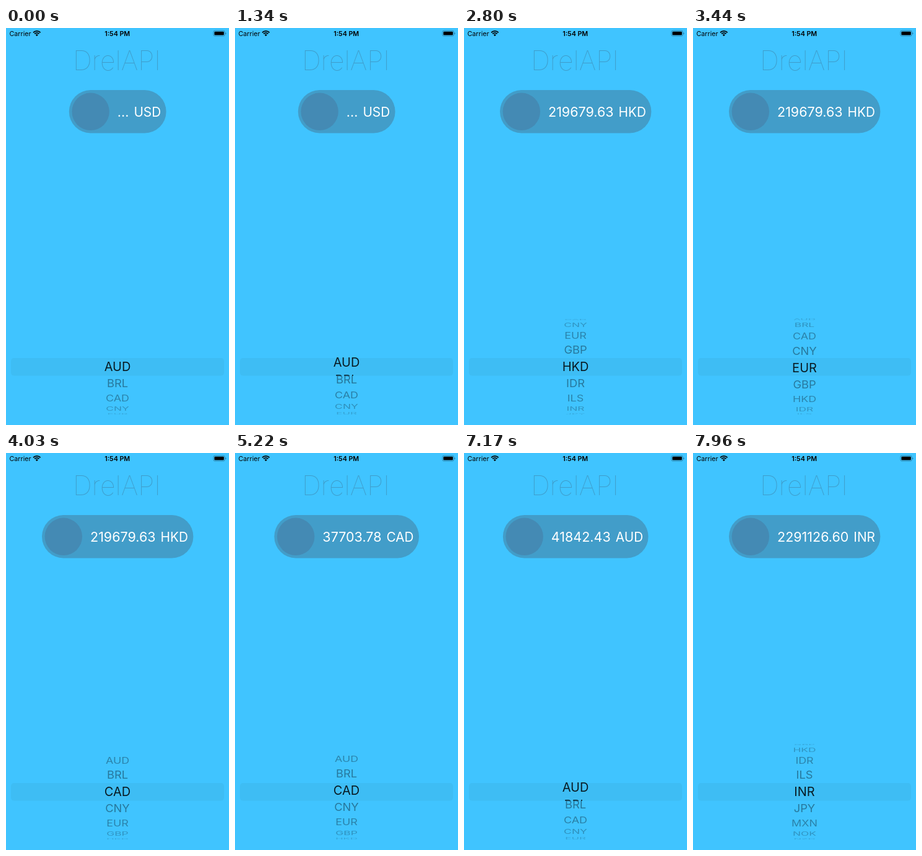
An HTML page that plays this animation: 360 px wide and 640 px high, repeating every 8 s.

```html
<!DOCTYPE html>
<html lang="en">
<head>
<meta charset="utf-8">
<title>Currency picker</title>
<style>
  html, body { margin: 0; width: 100%; height: 100%; overflow: hidden; background: #40c4ff; }
  svg { display: block; width: 100%; height: 100%; font-family: Inter, Roboto, "Liberation Sans", sans-serif; }
  .title { font-size: 43px; font-weight: 100; fill: #3f9bc8; }
  .status { font-size: 10.7px; }
  .price { font-size: 21.5px; fill: #fff; }
  #code { font-size: 20.8px; }
  .wheel { text-anchor: middle; }
</style>
</head>
<body>
<svg viewBox="0 0 360 640">
  <defs>
    <clipPath id="outside"><path d="M0 460H360V531H0ZM0 560.7H360V640H0Z"/></clipPath>
    <clipPath id="inside"><path d="M0 531H360V560.7H0Z"/></clipPath>
  </defs>
  <rect width="360" height="640" fill="#40c4ff"/>

  <g class="status">
    <text x="5.5" y="13">Carrier</text>
    <text x="179.7" y="13" font-weight="600" text-anchor="middle">1:54 PM</text>
    <g fill="none" stroke="#000" stroke-width="1.8">
      <path d="M44 7.3A8.2 8.2 0 0 1 55.6 7.3"/>
      <path d="M46.1 9.4A5.2 5.2 0 0 1 53.5 9.4"/>
    </g>
    <path d="M49.8 13.2L47.7 11.1A3 3 0 0 1 51.9 11.1Z"/>
    <rect x="334.9" y="4.2" width="18.4" height="8.9" rx="2.5" fill="none" stroke="#000" stroke-opacity=".32" stroke-width=".9"/>
    <rect x="336.4" y="5.7" width="15.4" height="5.9" rx="1.3"/>
    <path d="M354.3 7.2Q355.6 7.8 355.6 8.7T354.3 10.2Z" fill-opacity=".4"/>
  </g>

  <text class="title" x="179" y="68" text-anchor="middle">DrelAPI</text>

  <g id="pill" class="price">
    <rect id="back" y="100" height="69.4" rx="34.7" fill="#429dc9"/>
    <circle cx="34.8" cy="134.8" r="30.2" fill="#448ab4"/>
    <text id="num" x="78" y="142.6"></text>
    <text id="code" y="142.6"></text>
  </g>

  <rect x="8" y="532" width="344" height="28.6" rx="5" fill="#3ebdf4"/>
  <g class="wheel" id="rows" clip-path="url(#outside)" font-size="18.4"></g>
  <g class="wheel" id="lens" clip-path="url(#inside)" font-size="20" fill-opacity=".86"></g>
</svg>
<script>
const LOOP = 8000, TICK = 113;
const CENTER = 546, RADIUS = 77, STEP = 20.5;
const NUM_X = 78, GAP = 8, PAD = 8.4;
const CODES = "AUD BRL CAD CNY EUR GBP HKD IDR ILS INR JPY MXN NOK NZD PLN RON".split(" ");
const $ = id => document.getElementById(id);

const smooth = p => p * p * (3 - 2 * p);
const easeOut = p => p * (2 - p);

const prices = [
  { start: 0, amount: "...", code: "USD" },
  { start: 2800, amount: "219679.63", code: "HKD" },
  { start: 5220, amount: "37703.78", code: "CAD" },
  { start: 7170, amount: "41842.43", code: "AUD" },
  { start: 7960, amount: "2291126.60", code: "INR" }
];

// Each gesture turns the wheel between two row positions, then holds.
const gesture = (start, end, from, to, ease) => ({ start, end, from, to, ease });
const gestures = [
  gesture(0, 1, 0, 0, smooth),
  gesture(1230, 1820, .25, 6.25, smooth),
  gesture(2090, 2400, 6.16, 6, easeOut),
  gesture(3200, 4030, 5.8, 2, easeOut),
  gesture(5220, 5480, 2.1, 2.36, easeOut),
  gesture(5590, 6220, 2.3, .13, smooth),
  gesture(6480, 6690, .07, 0, easeOut),
  gesture(7170, 7960, .25, 9, smooth)
];

const current = (list, t) => list.findLast(e => e.start <= t);

// The wheel is redrawn in even steps of about one tick.
function wheelAt(t) {
  const { start, end, from, to, ease } = current(gestures, t);
  const steps = Math.max(1, Math.round((end - start) / TICK));
  const step = Math.floor((t - start) / (end - start) * steps + .01);
  return from + (to - from) * ease(Math.min(step / steps, 1));
}

function fill(group) {
  return CODES.map(code => {
    const el = document.createElementNS("http://www.w3.org/2000/svg", "text");
    el.textContent = code;
    el.setAttribute("y", group.getAttribute("font-size") * .364);
    return group.appendChild(el);
  });
}
const rows = fill($("rows")), lens = fill($("lens"));

function drawWheel(pos) {
  CODES.forEach((_, i) => {
    const deg = (i - pos) * STEP, a = deg * Math.PI / 180, c = Math.cos(a);
    const shown = Math.abs(deg) < 88;
    const place = `translate(180 ${CENTER + RADIUS * Math.sin(a)}) scale(${1 - .11 * (1 - c)} ${c})`;
    for (const el of [rows[i], lens[i]]) {
      el.setAttribute("visibility", shown ? "visible" : "hidden");
      if (shown) el.setAttribute("transform", place);
    }
    rows[i].setAttribute("fill-opacity", .1 + .31 * Math.max(c, 0));
  });
}

// The pill grows with its text and stays centred.
function drawPill({ amount, code }) {
  $("num").textContent = amount;
  $("code").textContent = code;
  const codeX = NUM_X + $("num").getComputedTextLength() + GAP;
  const width = codeX + $("code").getComputedTextLength() + PAD;
  $("code").setAttribute("x", codeX);
  $("back").setAttribute("width", width);
  $("pill").setAttribute("transform", `translate(${180.2 - width / 2} 0)`);
}

let shownPos, shownPrice;
function frame() {
  const t = performance.now() % LOOP;
  const pos = wheelAt(t), price = current(prices, t);
  if (pos !== shownPos) drawWheel(shownPos = pos);
  if (price !== shownPrice) drawPill(shownPrice = price);
  requestAnimationFrame(frame);
}
frame();
</script>
</body>
</html>
```
